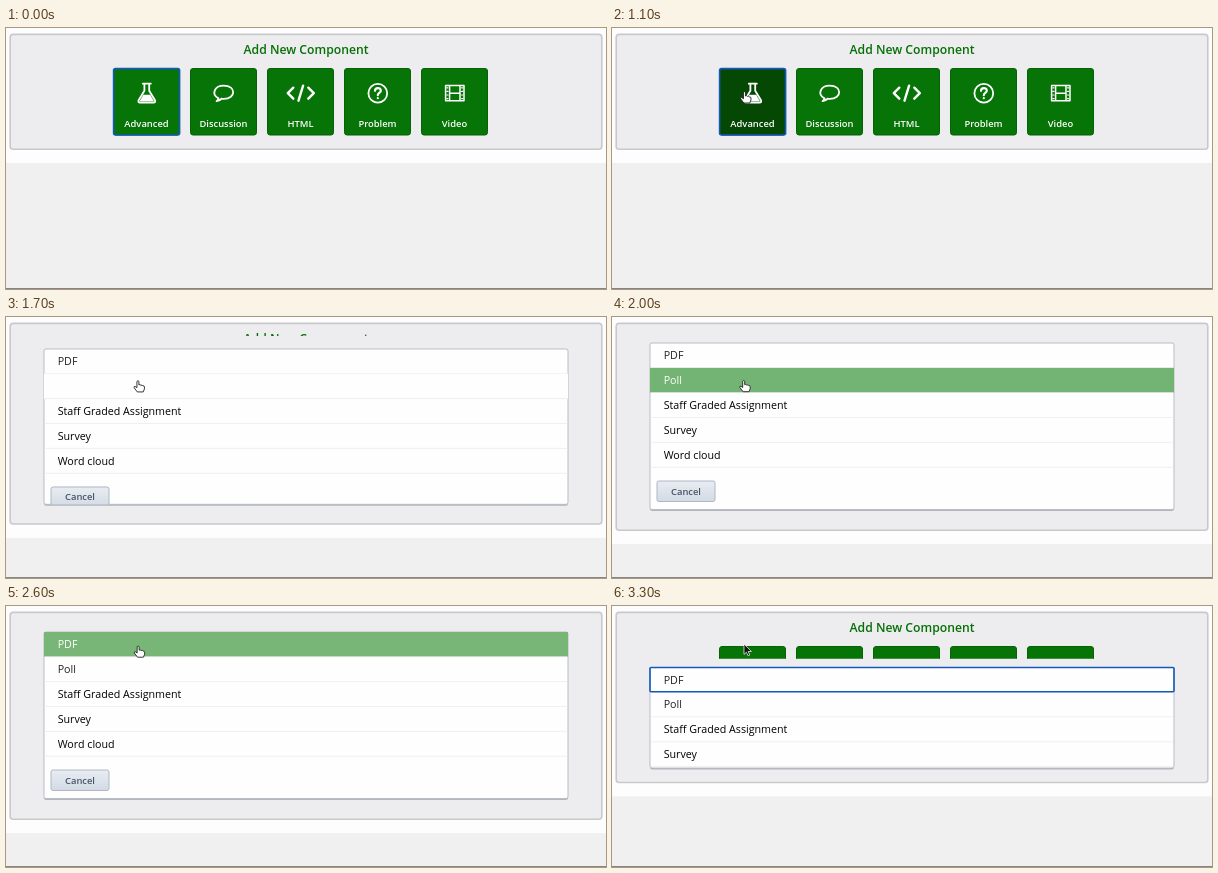
An HTML page that plays this animation: 600 by 261 pixels, repeating every 3.4 s.

```html
<!DOCTYPE html>
<html lang="en">
<head>
<meta charset="utf-8">
<title>Add New Component</title>
<style>
  html, body { margin: 0; width: 100%; height: 100%; overflow: hidden; background: #fdfdfd; }
  svg { display: block; font-family: "Open Sans", "Noto Sans", sans-serif; }
  .semi { font-weight: 600; text-anchor: middle; }
  .icon { fill: none; stroke: #fff; stroke-width: 1.8; stroke-linejoin: round; stroke-linecap: round; }
  .focus { fill: none; stroke: #1259bd; stroke-width: 1.6; }
</style>
</head>
<body>
<svg width="600" height="261" viewBox="0 0 600 261">
  <defs>
    <linearGradient id="cancelFill" x2="0" y2="1">
      <stop stop-color="#e9edf2"/><stop offset="1" stop-color="#d3dae4"/>
    </linearGradient>
    <clipPath id="menuClip"><rect id="menuMask" width="600"/></clipPath>
    <clipPath id="listClip"><rect id="listMask" x="37" width="526"/></clipPath>
  </defs>
  <rect id="page" width="600" height="261" fill="#f1f0f1"/>
  <rect y="260" width="600" height="1" fill="#858585"/>
  <rect id="panel" x="4.2" y="6.4" width="591.6" rx="3" fill="#edecee" stroke="#c9c9cc" stroke-width="1.6"/>

  <g clip-path="url(#menuClip)">
    <text class="semi" x="300" y="26" font-size="12.2" fill="#067006">Add New Component</text>
    <g id="buttons"></g>
    <rect id="buttonFocus" class="focus" x="107.6" y="40.6" width="66" height="66.4" rx="2"/>
  </g>

  <g id="list">
    <rect id="shadow" x="38" width="524" rx="2" fill="#b3b6bd"/>
    <rect id="sheet" x="38" width="524" rx="2" fill="#fefefe" stroke="#b9bdc5"/>
    <g clip-path="url(#listClip)"><g id="content">
      <g id="rows"></g>
      <rect x="45" y="138.5" width="58" height="20.5" rx="2" fill="url(#cancelFill)" stroke="#aeb7c4"/>
      <text class="semi" x="74" y="152" font-size="9.4" fill="#465468">Cancel</text>
      <rect id="rowFocus" class="focus" x="38" y=".8" width="524" height="24.2" rx="1"/>
    </g></g>
  </g>

  <g id="cursor">
    <path id="arrow" d="M0 0V10.4L2.4 8.2 4.1 11.8 5.8 11 4.1 7.5H7.4Z" fill="#111" stroke="#fff" stroke-width=".7"/>
    <path id="hand" d="M-1 1Q0-.6 1 1V4.5Q2.2 3.6 3 4.9 4.3 4.2 5 5.4 6.3 5 6.5 6.5V8.5L5.3 11.5H-.6L-3.8 7.3Q-4.2 5.8-2.8 6L-1 7.3Z" fill="#fff" stroke="#222" stroke-width=".9"/>
  </g>
</svg>
<script>
const LOOP = 3400, STEP = 100, SLIDE = 269, FADE = 400;
const $ = id => document.getElementById(id);
const set = (el, attrs) => { for (const k in attrs) el.setAttribute(k, attrs[k]); };
const show = (el, on) => set(el, { visibility: on ? 'visible' : 'hidden' });
const clamp = v => Math.max(0, Math.min(1, v));
const swing = v => (1 - Math.cos(Math.PI * clamp(v))) / 2;
const mix = (a, b, v) => `rgb(${a.map((c, i) => Math.round(c + (b[i] - c) * v))})`;

// Icons are drawn around their own centre.
const filmHoles = [-7.4, 7.4].map(x => [-5.4, -1.8, 1.8, 5.4].map(y => `M${x - .6} ${y}h1.2`).join('')).join('');
const icons = {
  Advanced: '<path d="M-4-9.5H4M-2.4-9.5V-2.5L-8.2 7Q-9 9.3-6.8 9.3H6.8Q9 9.3 8.2 7L2.4-2.5V-9.5"/><path d="M-3.4 1.5H3.4L7.2 8H-7.2Z" fill="#fff" stroke="none"/>',
  Discussion: '<path d="M-5.3 5.2C-12.5 1.5-10-7.6 0-7.6 12.5-7.6 12.5 5.6 0 5.6Q-1.2 5.6-2.2 5.4-4.2 7.8-7.2 8-5.4 6.8-5.3 5.2Z"/>',
  HTML: '<path d="M-7.5-5.5-13 0-7.5 5.5M7.5-5.5 13 0 7.5 5.5M2.3-7.5-2.3 7.5" stroke-width="2.4"/>',
  Problem: '<circle r="9.4"/><path d="M-2.8-2.4C-2.8-6 3-6 3-2.5 3-.3 0-.2 0 2M0 4.9v.1" stroke-width="2.2"/>',
  Video: `<path d="M-9.2-7.6H9.2V7.6H-9.2ZM-5.2-7.6V7.6M5.2-7.6V7.6M-5.2 0H5.2" stroke-width="1.5"/><path d="${filmHoles}" stroke-width="1.2"/>`
};
$('buttons').innerHTML = Object.keys(icons).map((name, i) => `
  <g transform="translate(${107 + 77 * i} 40)">
    <rect class="face" x=".5" y=".5" width="66" height="66.5" rx="2.5" fill="#067406" stroke="#056305"/>
    <g class="icon" transform="translate(33.8 25.2)">${icons[name]}</g>
    <text class="semi" x="33.5" y="58.5" font-size="9.4" fill="#fff">${name}</text>
  </g>`).join('');
const face = document.querySelector('.face');

const rowNames = ['PDF', 'Poll', 'Staff Graded Assignment', 'Survey', 'Word cloud'];
$('rows').innerHTML = rowNames.map((name, i) => `
  <g transform="translate(0 ${i * 24.9})">
    <rect x="38" y=".5" width="524" height="24.9" fill="none"/>
    <path d="M38.5 25.2H561.5" stroke="#ededee" stroke-width=".8"/>
    <text x="51.7" y="16.8" font-size="10.7">${name}</text>
  </g>`).join('');
const rows = [...$('rows').children];

// Pointer path: time, x, y.
const path = [[600, 240, 238], [700, 194, 155], [800, 160, 108], [950, 137, 70],
  [1050, 132.5, 63.5], [1600, 132, 63.5], [2250, 131.5, 63], [2400, 132.3, 42], [2750, 132, 38], [LOOP, 132, 38]];

function pointerAt(t) {
  const i = path.findIndex(p => p[0] > t);
  if (i < 1) return null;
  const [a, b] = [path[i - 1], path[i]], v = (t - a[0]) / (b[0] - a[0]);
  return [a[1] + (b[1] - a[1]) * v, a[2] + (b[2] - a[2]) * v];
}

function styleRow(row, t, from, to) {
  const on = t >= from && t < to;
  const [back, , label] = row.children;
  set(back, { fill: on ? mix([254, 254, 254], [68, 154, 68], clamp((t - from) / FADE)) : 'none' });
  set(label, { fill: on ? '#fff' : '#222' });
}

function draw(t) {
  const open = swing((t - 1476) / SLIDE) - swing((t - 3183) / SLIDE);
  const top = 114.5 - 88.5 * open, height = 2 + 165 * open, extra = 92 * open;

  set($('page'), { y: 135 + extra });
  set($('panel'), { height: 114.8 + extra });
  set($('menuMask'), { height: 114 - 102 * open });

  show($('list'), open > 0);
  set($('sheet'), { y: top, height: height - .5 });
  set($('shadow'), { y: top + 1, height });
  set($('listMask'), { y: top - 1, height: height + .5 });
  set($('content'), { transform: `translate(0 ${top - .5})` });

  const dark = t < 3260 ? clamp((t - 810) / 250) : 0;
  set(face, { fill: mix([6, 116, 6], [4, 72, 4], dark), stroke: mix([5, 99, 5], [3, 62, 3], dark) });
  show($('buttonFocus'), t < 1400);

  styleRow(rows[0], t, 2310, 3260);
  styleRow(rows[1], t, 1700, 2310);
  $('rowFocus').style.display = t >= 2900 ? '' : 'none';

  const at = pointerAt(t), hand = t >= 810 && t < 3260;
  show($('arrow'), at && !hand);
  show($('hand'), at && hand);
  if (at) set($('cursor'), { transform: `translate(${at})` });
}

function tick() {
  draw(Math.floor(performance.now() % LOOP / STEP) * STEP);
  requestAnimationFrame(tick);
}
tick();
</script>
</body>
</html>
```
